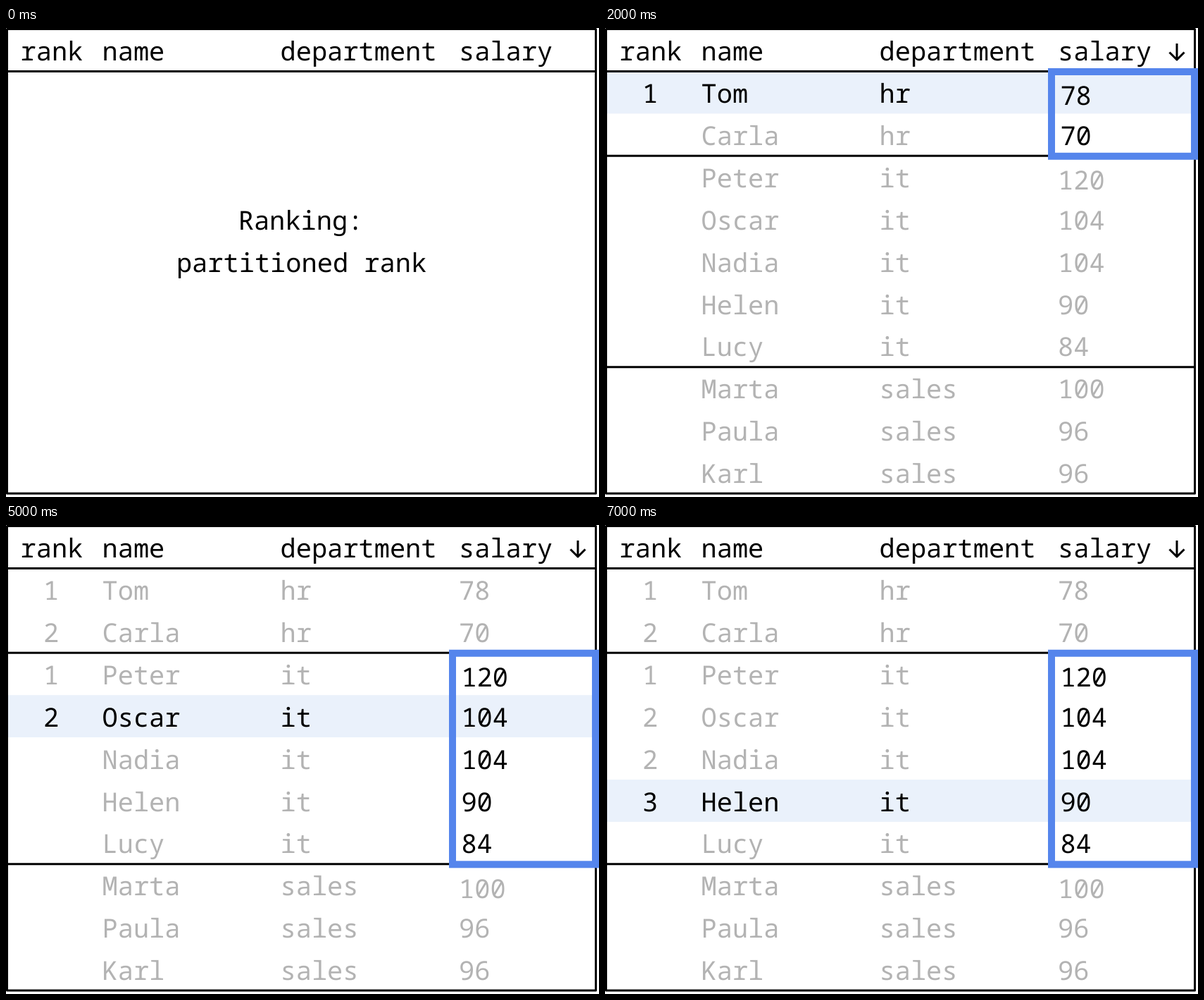
An HTML page that plays this animation: 842x665 px, repeating every 8000 ms.

```html
<!DOCTYPE html>
<html lang="en">
<head>
<meta charset="utf-8">
<title>Partitioned rank</title>
<style>
  html, body { margin: 0; width: 100%; height: 100%; overflow: hidden; background: #fff; }
  svg { display: block; width: 842px; height: 665px; }
  text { font: 37px "Noto Sans Mono", "DejaVu Sans Mono", monospace; white-space: pre; text-rendering: geometricPrecision; }
  .mid { text-anchor: middle; }
  .dim { fill: #b3b3b3; }
  .line { fill: none; stroke: #000; stroke-width: 3; stroke-linejoin: round; }
  .mark { fill: #eaf1fb; }
  .frame { fill: none; stroke: #5585ec; stroke-width: 10; }
</style>
</head>
<body>
<svg id="stage" viewBox="0 0 842 665"></svg>
<script>
const STEP = 1000, STEPS = 8, ROW = 59.9;
const COL = { rank: 20.5, name: 136.5, department: 389.5, salary: 643 };

// name, department, salary, rank within department
const people = [
  ["Tom", "hr", 78, 1],
  ["Carla", "hr", 70, 2],
  ["Peter", "it", 120, 1],
  ["Oscar", "it", 104, 2],
  ["Nadia", "it", 104, 2],
  ["Helen", "it", 90, 3],
  ["Lucy", "it", 84, 4],
  ["Marta", "sales", 100, 1],
  ["Paula", "sales", 96, 2],
  ["Karl", "sales", 96, 2]
];

const stage = document.getElementById("stage");
const lineY = i => 61.5 + i * ROW;
const baseY = i => 106 + i * ROW;
const text = (x, y, s, cls = "") => `<text x="${x}" y="${y}" class="${cls}">${s}</text>`;
const path = d => `<path class="line" d="${d}"/>`;
const rule = i => path(`M2 ${lineY(i)}H837`);
const rect = (cls, x, y, w, h) =>
  `<rect class="${cls}" x="${x}" y="${y}" width="${w}" height="${h}"/>`;

function grid() {
  const heads = Object.entries(COL).map(([label, x]) => text(x, 46, label));
  return heads.join("") + rect("line", 1.5, 1.5, 836, 658.5) + rule(0);
}

function title() {
  return text(418.5, baseY(3), "Ranking:", "mid") +
         text(419.5, baseY(4), "partitioned rank", "mid");
}

function table(cur) {
  const walking = cur >= 0;
  const dept = walking ? people[cur][1] : null;
  const first = people.findIndex(p => p[1] === dept);
  const end = first + people.filter(p => p[1] === dept).length;

  const cells = people.map(([name, dep, salary, rank], i) => {
    const y = baseY(i);
    const tone = walking && i !== cur ? "dim" : "";
    const inside = walking && dep === dept;
    // the frame pushes down the first salary inside it and the first one below
    const drop = walking && (i === first || i === end) ? 3.4 : 0;
    return (i <= cur ? text(64, y, rank, "mid " + tone) : "") +
      text(COL.name, y, name, tone) +
      text(COL.department, y, dep, tone) +
      text(COL.salary + (inside ? 3.4 : 0), y + drop, salary, walking && !inside ? "dim" : "");
  }).join("");

  const mark = walking ? rect("mark", 3, lineY(cur), 830, ROW) : "";
  const frame = walking ? rect("frame", 634, lineY(first) + 0.5, 203, (end - first) * ROW) : "";
  const arrow = path("M812 22V45M801.5 34.5L812 45L822.5 34.5");
  return mark + grid() + rule(2) + rule(7) + arrow + cells + frame;
}

let shown = -1;
function tick(now) {
  const step = Math.floor(now / STEP) % STEPS;
  if (step !== shown) {
    shown = step;
    stage.innerHTML = step ? table(step - 2) : grid() + title();
  }
  requestAnimationFrame(() => tick(performance.now() - start));
}
const start = performance.now();
tick(0);
</script>
</body>
</html>
```
